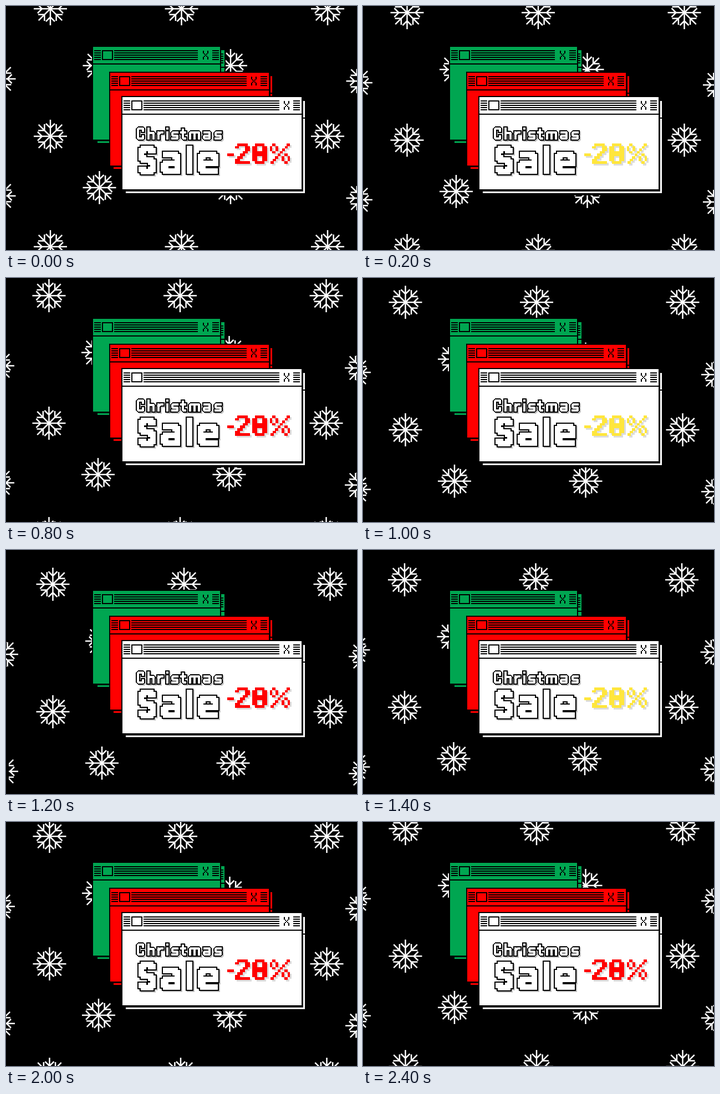
Write an HTML page that moves like this. It is 633 px wide and 442 px high and loops after 2600 ms.

```html
<!DOCTYPE html>
<html lang="en">
<head>
<meta charset="utf-8">
<title>Christmas Sale</title>
<style>
  html, body { margin: 0; width: 100%; height: 100%; overflow: hidden; background: #000; }
  svg { display: block; width: 100%; height: 100%; }
  .pixel { shape-rendering: crispEdges; }
  .letters { fill: none; stroke-linecap: square; }
  #christmas { stroke-linejoin: bevel; }
</style>
</head>
<body>
<svg viewBox="0 0 633 442" role="img" aria-label="Christmas Sale -20%">
  <defs>
    <path id="arm" d="M0 0V-30M-8-23L0-15 8-23"/>
    <g id="flake" fill="none" stroke="#fff" stroke-width="2.5"></g>
    <path id="christmas" d="M247 226V222H238V240H247V236
      M257 222V240M257 230H266V240
      M275 229V240M275 232L279 229H282
      M291 229V240M291 222h.01
      M309 229H300V234.5H309V240H300
      M319 224V240H323M316 229H323
      M332 240V229H348V240M340 229V240
      M358 229H367V240H357V235H367
      M387 229H378V234.5H387V240H378"/>
    <path id="sale" d="M265 262H261V258H248V262H244V275H248V279H261V283H265V296H261V300H248V296H244
      M288 269H305V273H309V299H288V295H284V289H288V285H309
      M331 258V299
      M378 285V273H374V269H355V273H351V295H355V299H377M351 285H378"/>
    <path id="discount" fill="none" d="M0 4.5H2.6
      M4 .5H8M3 1.5H4.5M7 1.5H9M7 2.5H9M6 3.5H8M5 4.5H7M4 5.5H6M3 6.5H5M3 7.5H9
      M10.8 .5H14.6M10.3 1V7M11.3 1V7M14.1 1V7M15.1 1V7M12.2 3V5M13.2 3V5M10.8 7.5H14.6
      M17.7 .5h1.2M17.2 1v2M19.4 1v2M17.7 3.5h1.2
      M23.3 .5h1.2M22.5 1.5h1.2M21.5 2.5h1.2M20.6 3.5h1.2M19.7 4.5h1.2M18.8 5.5h1.2M17.9 6.5h1.2M17 7.5h1.2
      M22.4 4.5h1.2M21.9 5v2M24.1 5v2M22.4 7.5h1.2"/>
  </defs>
  <rect width="633" height="442"/>
  <g id="snow"></g>
  <g id="windows" class="pixel"></g>
  <g class="pixel letters" id="title"></g>
  <g class="pixel" transform="translate(399 249) scale(4.6)">
    <use href="#discount" x=".65" y=".65" stroke="#dcdcdc"/>
    <use href="#discount" id="price"/>
  </g>
</svg>
<script>
  const $ = id => document.getElementById(id);
  const snow = $('snow'), price = $('price');
  const use = (id, attrs) => `<use href="#${id}" ${attrs}/>`;

  $('flake').innerHTML = [0, 45, 90, 135, 180, 225, 270, 315]
    .map(a => use('arm', `transform="rotate(${a})"`)).join('');

  // Flake places relative to the top left one
  const spots = [];
  for (const y of [0, 231, 431]) for (const x of [0, 236.5, 500]) spots.push([x, y]);
  for (const y of [103, 324]) for (const x of [88.5, 325]) spots.push([x, y]);
  spots.push([-92.5, 127], [-92.5, 339], [563.5, 131], [563.5, 343]);
  snow.innerHTML = spots.map(([x, y]) => use('flake', `x="${x}" y="${y}"`)).join('') +
    '<rect x="-130" y="305" width="50.5" height="68"/>';

  const box = (x, y, w, h, fill) =>
    `<rect x="${x}" y="${y}" width="${w}" height="${h}" fill="${fill}"/>`;

  // gapX and gapY: black edge on the right and below; end: where the right stripes stop
  function panel(x, y, w, h, color, gapX, gapY, end) {
    let s = box(-2, -2, w + 2 + gapX, h + 2 + gapY, '#000') + box(0, 0, w, h, color) + box(0, 30, w, 2, '#000');
    for (let i = 0; i < 5; i++) {
      const ly = 6 + i * 4;
      s += box(2, ly, 12, 2, '#000') + box(38, ly, w - 78, 2, '#000') + box(w - end - 12, ly, 12, 2, '#000');
    }
    s += box(16, 6, 20, 18, '#000') + box(18, 8, 16, 14, color);
    s += `<path transform="translate(${w - end - 24} 15)" stroke="#000" stroke-width="2"
      d="M-4-8v5M4-8v5M-2-3v2M2-3v2M0-1v2M-2 1v2M2 1v2M-4 3v5M4 3v5"/>`;
    return `<g transform="translate(${x} ${y})">${s}</g>`;
  }

  const stacked = (x, y, w, h, color, dx, dy, ...edges) =>
    panel(x + dx, y + dy, w, h, color, ...edges) + panel(x, y, w, h, color, ...edges);

  $('windows').innerHTML =
    stacked(157, 74, 229, 168, '#00a651', 8, 6, 2, 3, 2) +
    stacked(188, 121, 286, 168, '#f00', 6, 6, 3, 3, 3) +
    stacked(210, 165, 323, 167, '#fff', 6, 7, 3, 4, 3);

  const outlined = (id, outer, inner, drop) =>
    use(id, `x="${drop}" y="${drop}" stroke="#c4c4c4" stroke-width="${outer}"`) +
    use(id, `stroke="#000" stroke-width="${outer}"`) +
    use(id, `stroke="#fff" stroke-width="${inner}"`);
  $('title').innerHTML = outlined('christmas', 8, 4, 2) + outlined('sale', 14, 10, 2);

  // Snow position at each step of the loop
  const STEP = 200;
  const drift = [
    [80, 5], [79.5, 12], [79, 19], [78.5, 26], [77.5, 32], [76.5, 44], [84.5, 62],
    [75, 54], [85.5, 45], [82, 38], [78.5, 26], [77.5, 19], [76.5, 12]
  ];

  function draw(time) {
    const i = Math.floor(time / STEP) % drift.length;
    snow.setAttribute('transform', `translate(${drift[i]})`);
    price.setAttribute('stroke', i % 2 ? '#ffe63c' : '#f00');
  }

  const start = performance.now();
  function tick() {
    draw(performance.now() - start);
    requestAnimationFrame(tick);
  }
  tick();
</script>
</body>
</html>
```
